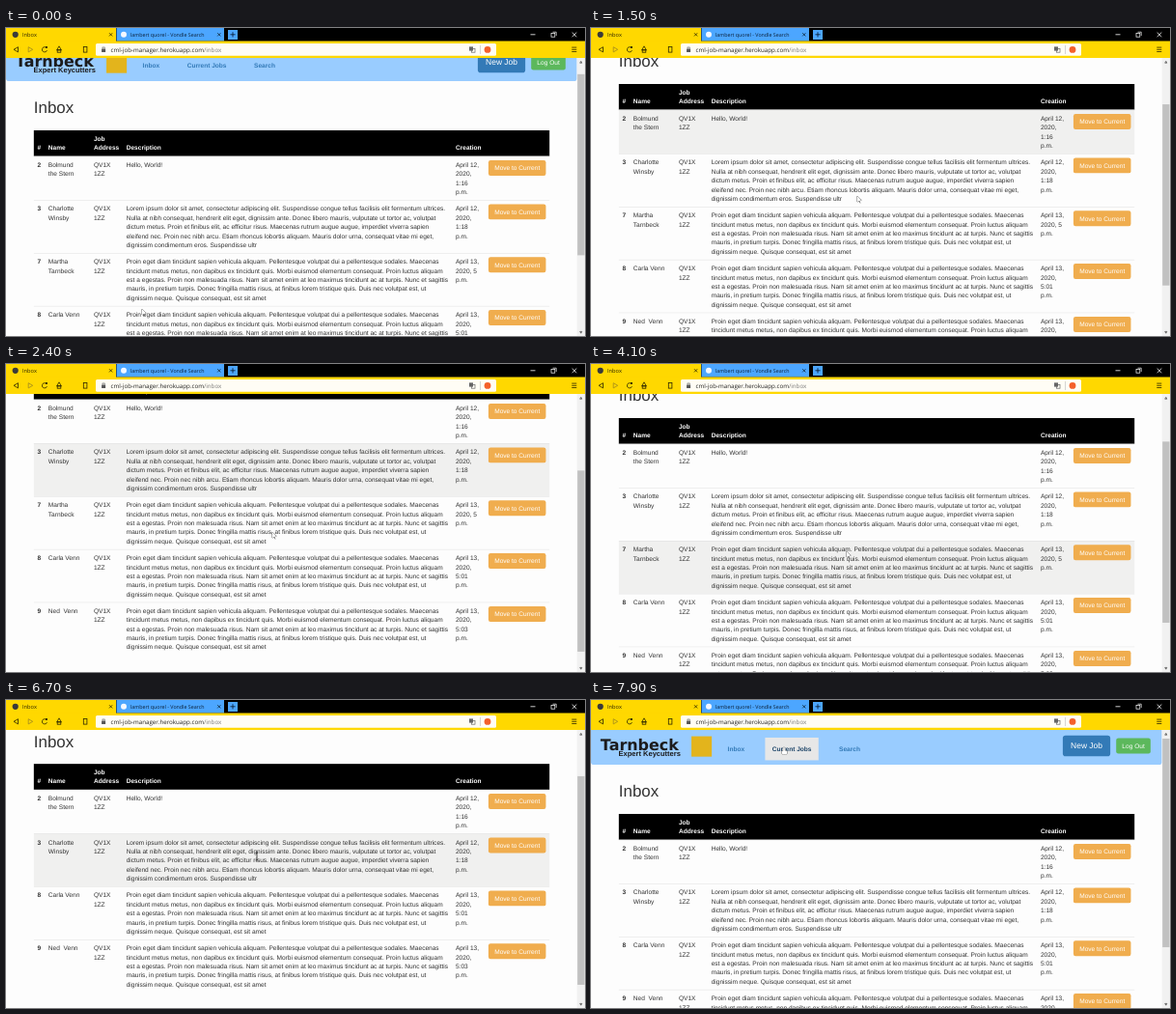
Animation of 600 by 319 pixels, one loop 8 s. Source, as an HTML page with a canvas:

```html
<!DOCTYPE html>
<html lang="en">
<head>
<meta charset="utf-8">
<title>Inbox</title>
<style>
  html, body { margin: 0; width: 600px; height: 319px; overflow: hidden; background: #fdfdfd; }
  canvas { display: block; width: 600px; height: 319px; }
</style>
</head>
<body>
<canvas id="stage"></canvas>
<script>
const W = 600, H = 319, LOOP = 8000, STEP = 100;
const K = 600 / 1280;       // page pixels to stage pixels
const TOP = 31;             // where the page starts below the browser bars
const SANS = '"Liberation Sans", Arial, sans-serif';
const UI = '"Open Sans", "Noto Sans", sans-serif';
const INK = '#2b2600', YELLOW = '#ffd800', BLUE = '#4ca6ff';

const canvas = document.getElementById('stage');
const ctx = canvas.getContext('2d');
const dpr = window.devicePixelRatio || 1;
canvas.width = W * dpr;
canvas.height = H * dpr;

// ---------- content ----------
const LOREM = [
  'Lorem ipsum dolor sit amet, consectetur adipiscing elit. Suspendisse congue tellus facilisis elit fermentum ultrices.',
  'Nulla at nibh consequat, hendrerit elit eget, dignissim ante. Donec libero mauris, vulputate ut tortor ac, volutpat',
  'dictum metus. Proin et finibus elit, ac efficitur risus. Maecenas rutrum augue augue, imperdiet viverra sapien',
  'eleifend nec. Proin nec nibh arcu. Etiam rhoncus lobortis aliquam. Mauris dolor urna, consequat vitae mi eget,',
  'dignissim condimentum eros. Suspendisse ultr'
];
const PROIN = [
  'Proin eget diam tincidunt sapien vehicula aliquam. Pellentesque volutpat dui a pellentesque sodales. Maecenas',
  'tincidunt metus metus, non dapibus ex tincidunt quis. Morbi euismod elementum consequat. Proin luctus aliquam',
  'est a egestas. Proin non malesuada risus. Nam sit amet enim at leo maximus tincidunt ac at turpis. Nunc et sagittis',
  'mauris, in pretium turpis. Donec fringilla mattis risus, at finibus lorem tristique quis. Duis nec volutpat est, ut',
  'dignissim neque. Quisque consequat, est sit amet'
];
const LINE = 20, PAD = 8;
const row = (id, name, text, date) => ({
  id, name, text, date,
  height: Math.max(text.length, date.length) * LINE + 2 * PAD + 1
});
const ROWS = [
  row('2', ['Bolmund', 'the Stern'], ['Hello, World!'], ['April 12,', '2020,', '1:16', 'p.m.']),
  row('3', ['Charlotte', 'Winsby'], LOREM, ['April 12,', '2020,', '1:18', 'p.m.']),
  row('7', ['Martha', 'Tarnbeck'], PROIN, ['April 13,', '2020, 5', 'p.m.']),
  row('8', ['Carla Venn'], PROIN, ['April 13,', '2020,', '5:01', 'p.m.']),
  row('9', ['Ned \u00a0Venn'], PROIN, ['April 13,', '2020,', '5:03', 'p.m.'])
];
const ADDRESS = ['QV1X', '1ZZ'];
const COL = { id: 69.5, name: 93.5, address: 194, text: 266, date: 994, button: 1066.5 };
const TABLE = { x: 61.5, y: 185.6, w: 1140, head: 57 };
const MOVED_AT = 5500;      // row 7 leaves the list

// ---------- motion ----------
const START = 12, GLIDE = 350, SETTLE = 600;
const WHEEL = [[1110, 48], [1895, 48], [2450, -46], [6595, -47], [6900, -15]];
const POINTER = [
  { t: 0, x: 141, y: 291 },
  { t: 900, x: 276, y: 174, stay: 1800 },
  { t: 3700, x: 166, y: 206 },
  { t: 4100, x: 265, y: 194 },
  { t: 4800, x: 525, y: 196, stay: 700 },
  { t: 6300, x: 260, y: 162, stay: 700 },
  { t: 7600, x: 200, y: 49 }
];
const clamp = p => Math.min(1, Math.max(0, p));
const smooth = p => p * p * (3 - 2 * p);
const mix = (a, b, p) => a + (b - a) * p;

const scrollAt = t => WHEEL.reduce((y, [at, d]) => y + d * smooth(clamp((t - at) / GLIDE)), START);
// hover catches up only some time after the wheel stops
const hoverScrollAt = t => WHEEL.reduce((y, [at, d]) => y + (t >= at + SETTLE ? d : 0), START);

function pointerAt(t) {
  const i = POINTER.findLastIndex(s => s.t <= t);
  const a = POINTER[i], b = POINTER[i + 1] || a;
  const leave = a.t + (a.stay || 0);
  const p = smooth(clamp((t - leave) / (b.t - leave || 1)));
  return { x: mix(a.x, b.x, p), y: mix(a.y, b.y, p) };
}

// ---------- drawing helpers ----------
function rect(x, y, w, h, fill) {
  ctx.fillStyle = fill;
  ctx.fillRect(x, y, w, h);
}
function frame(x, y, w, h, color, width = 0.8) {
  ctx.strokeStyle = color;
  ctx.lineWidth = width;
  ctx.strokeRect(x, y, w, h);
}
function round(x, y, w, h, r, fill) {
  ctx.beginPath();
  ctx.roundRect(x, y, w, h, r);
  ctx.fillStyle = fill;
  ctx.fill();
}
function disc(x, y, r, fill) {
  round(x - r, y - r, 2 * r, 2 * r, r, fill);
}
function stroke(x1, y1, x2, y2, color, width = 0.8) {
  ctx.beginPath();
  ctx.moveTo(x1, y1);
  ctx.lineTo(x2, y2);
  ctx.strokeStyle = color;
  ctx.lineWidth = width;
  ctx.stroke();
}
function triangle(x, y, r, turn, color) {
  ctx.beginPath();
  for (let i = 0; i < 3; i++) {
    const a = turn + i * Math.PI * 2 / 3;
    ctx.lineTo(x + r * Math.cos(a), y + r * Math.sin(a));
  }
  ctx.closePath();
  ctx.strokeStyle = color;
  ctx.lineWidth = 0.8;
  ctx.stroke();
}
function cross(x, y, r, color) {
  stroke(x - r, y - r, x + r, y + r, color);
  stroke(x - r, y + r, x + r, y - r, color);
}
function text(s, x, y, font, color, align = 'left') {
  ctx.font = font;
  ctx.fillStyle = color;
  ctx.textAlign = align;
  ctx.fillText(s, x, y);
}
function lines(list, x, top, color = '#333', weight = 400) {
  list.forEach((s, i) => text(s, x, top + 15 + i * LINE, `${weight} 14px ${SANS}`, color));
}
function button(label, x, y, w, h, size, fill) {
  round(x, y, w, h, size / 3, fill);
  text(label, x + w / 2, y + h / 2 + size * 0.35, `${size}px ${SANS}`, '#fff', 'center');
}
const inside = (p, x, y, w, h) => p.x >= x && p.x < x + w && p.y >= y && p.y < y + h;

// ---------- page ----------
function drawNav(mouse) {
  round(0, -4, 1262, 81, 6, '#99ccff');
  text('Tarnbeck', 21, 45, '700 34px "DejaVu Sans", sans-serif', '#1c1c1c');
  text('Expert Keycutters', 198, 57, `700 16px ${SANS}`, '#1c1c1c', 'right');
  rect(222, 14, 45, 45, '#e3b41c');
  const font = `700 14px ${SANS}`, gap = 15.5;
  let x = 302, link = false;
  for (const label of ['Inbox', 'Current Jobs', 'Search']) {
    ctx.font = font;
    const w = ctx.measureText(label).width;
    const over = inside(mouse, x - gap, 17, w + 2 * gap, 50);
    if (over) rect(x - gap, 17, w + 2 * gap, 50, '#e7e7e7');
    text(label, x, 46, font, over ? '#1d4468' : '#337ab7');
    link = link || over;
    x += w + 4 * gap - 1;
  }
  button('New Job', 1043, 12, 105, 46, 18, '#337ab7');
  button('Log Out', 1161, 18, 76, 34, 14, '#5cb85c');
  return link;
}

function drawTable(rows, mouse, active) {
  const { x, y, w, head } = TABLE;
  const low = y + PAD + LINE;
  rect(x, y, w, head, '#000');
  lines(['#'], COL.id, low, '#fff', 700);
  lines(['Name'], COL.name, low, '#fff', 700);
  lines(['Job', 'Address'], COL.address, y + PAD, '#fff', 700);
  lines(['Description'], COL.text, low, '#fff', 700);
  lines(['Creation'], COL.date, low, '#fff', 700);

  let top = y + head, link = false;
  for (const r of rows) {
    if (active && inside(mouse, x, top, w, r.height)) rect(x, top, w, r.height, '#f0f0ef');
    rect(x, top, w, 1, '#ddd');
    const t = top + PAD + 1;
    lines([r.id], COL.id, t, '#333', 700);
    lines(r.name, COL.name, t);
    lines(ADDRESS, COL.address, t);
    lines(r.text, COL.text, t);
    lines(r.date, COL.date, t);
    const over = inside(mouse, COL.button, t, 127, 34);
    button('Move to Current', COL.button, t, 127, 34, 14, over ? '#ec971f' : '#f0ad4e');
    link = link || over;
    top += r.height;
  }
  return link;
}

function drawScrollbar(scroll, rows) {
  const height = rows.reduce((sum, r) => sum + r.height, TABLE.y + TABLE.head + 80) * K;
  const rate = 271 / height;
  rect(591.7, TOP, 8.3, H - TOP, '#f1f1f1');
  rect(592.2, 40 + scroll * rate, 7.3, (H - TOP) * rate, '#c1c1c1');
  triangle(595.8, 35.6, 1.2, -Math.PI / 2, '#505050');
  triangle(595.8, 315, 1.2, Math.PI / 2, '#505050');
}

// ---------- browser bars ----------
function drawTabs() {
  const y = 6.8;
  rect(0, 0, W, 14, '#000');
  rect(0, 0, 114, 14, YELLOW);
  rect(114.5, 0, 111.5, 13.5, BLUE);
  disc(9.7, y, 3.1, '#3a3a3a');
  text('Inbox', 17, 8.9, `5.7px ${UI}`, INK);
  cross(108.6, y, 1.6, INK);
  disc(122, y, 3, '#f4f8ff');
  text('lambert quorel - Vondle Search', 129, 8.9, `5.3px ${UI}`, '#0c2238');
  cross(220.8, y, 1.6, '#0c2238');
  rect(230, 2, 10, 10, BLUE);
  stroke(232.4, y, 237.6, y, '#06182a');
  stroke(235, y - 2.6, 235, y + 2.6, '#06182a');

  stroke(543.5, y, 548.5, y, '#fff');
  frame(565, 5.4, 3.8, 3.8, '#fff', 0.7);
  stroke(566.5, 4.2, 570.2, 4.2, '#fff', 0.7);
  stroke(570.2, 4.2, 570.2, 8, '#fff', 0.7);
  cross(589, y, 2.3, '#fff');
}

function drawToolbar() {
  const y = 22.3;
  rect(0, 13.5, W, TOP - 13.5, YELLOW);
  triangle(11, y, 3, Math.PI, INK);
  triangle(24.7, y, 3, 0, '#a08a20');
  ctx.beginPath();
  ctx.arc(40, y, 2.6, 0.3, Math.PI * 1.7);
  ctx.strokeStyle = INK;
  ctx.stroke();
  rect(41, 19, 1.9, 1.9, INK);
  triangle(55, 21.6, 2.8, -Math.PI / 2, INK);
  frame(53.2, 22.6, 3.6, 2.6, INK);
  frame(80.3, 19.5, 3.6, 5.6, INK);

  round(93, 16, 415, 12.7, 1.5, '#fffdf5');
  rect(99.1, 21.8, 4, 3.2, '#555');
  frame(100, 20, 2.2, 2, '#555', 0.6);
  const font = `6.2px ${UI}`, host = 'cml-job-manager.herokuapp.com';
  text(host, 108.6, 24.6, font, '#222');
  text('/inbox', 108.6 + ctx.measureText(host).width, 24.6, font, '#777');
  rect(480, 19.4, 4, 4.2, '#666');
  frame(482.4, 21.4, 3.6, 3.8, '#666', 0.7);
  rect(491, 18, 0.6, 9, '#bbb');
  disc(499, 22.4, 3.4, '#f4602a');
  for (let i = -1; i <= 1; i++) stroke(586.3, y + 2.2 * i, 591.3, y + 2.2 * i, INK);
}

// ---------- pointer ----------
function drawPointer({ x, y }, kind) {
  ctx.save();
  ctx.translate(x, y);
  if (kind === 'beam') {
    stroke(0, -4, 0, 4, '#222');
    stroke(-1.4, -4, 1.4, -4, '#222', 0.7);
    stroke(-1.4, 4, 1.4, 4, '#222', 0.7);
  } else {
    ctx.beginPath();
    if (kind === 'hand') {
      ctx.roundRect(-0.8, 0, 1.6, 5, 0.8);
      ctx.roundRect(-2, 3.4, 5, 4, 1.2);
    } else {
      ctx.lineTo(0, 0);
      ctx.lineTo(0, 6);
      ctx.lineTo(4.2, 4.2);
      ctx.closePath();
    }
    ctx.strokeStyle = '#666';
    ctx.lineWidth = 1;
    ctx.stroke();
    ctx.fillStyle = '#fff';
    ctx.fill();
    if (kind === 'arrow') stroke(1.8, 5, 3, 7.4, '#666');
  }
  ctx.restore();
}

// ---------- frame ----------
function draw(t) {
  const scroll = scrollAt(t);
  const pointer = pointerAt(t);
  const rows = t < MOVED_AT ? ROWS : ROWS.filter(r => r.id !== '7');
  const mouse = { x: pointer.x / K, y: (pointer.y - TOP + hoverScrollAt(t)) / K };

  ctx.setTransform(dpr, 0, 0, dpr, 0, 0);
  ctx.textRendering = 'geometricPrecision';
  rect(0, 0, W, H, '#fdfdfd');

  ctx.save();
  ctx.translate(0, TOP - scroll);
  ctx.scale(K, K);
  const onNav = drawNav(mouse);
  text('Inbox', TABLE.x, 148, `36px ${SANS}`, '#333');
  const onButton = drawTable(rows, mouse, t > 0);
  ctx.restore();

  drawScrollbar(scroll, rows);
  drawTabs();
  drawToolbar();
  const reading = t >= 6000 && t < 7000;
  drawPointer(pointer, onNav || onButton ? 'hand' : reading ? 'beam' : 'arrow');
}

const start = performance.now();
function tick() {
  const t = (performance.now() - start) % LOOP;
  draw(Math.floor(t / STEP) * STEP);
  requestAnimationFrame(tick);
}
tick();
</script>
</body>
</html>
```
